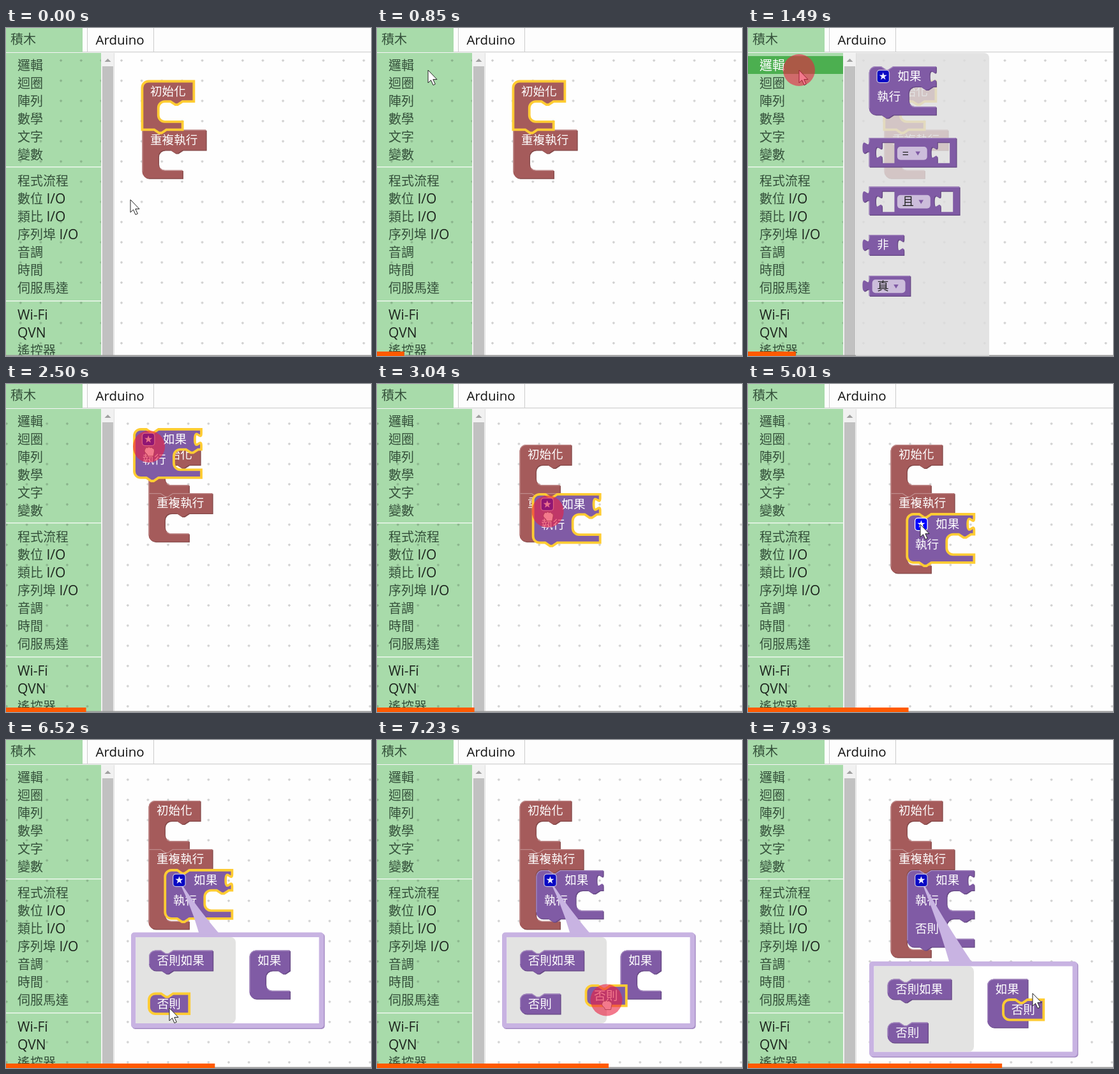
An HTML page for the animation above (8000 ms loop, 572 by 514 pixels).

```html
<!DOCTYPE html>
<html lang="zh-Hant">
<head>
<meta charset="utf-8">
<title>Blocks</title>
<style>
html, body { margin: 0; width: 100%; height: 100%; overflow: hidden; background: #fff; }
svg { display: block; width: 572px; height: 514px; }
text { font-family: "Open Sans", "Noto Sans CJK TC", "Noto Sans CJK", sans-serif; white-space: pre; }
</style>
</head>
<body>
<svg id="stage" viewBox="0 0 572 514">
  <defs>
    <pattern id="dots" width="31.64" height="31.64" patternUnits="userSpaceOnUse">
      <path d="M13.8 15.8h4M15.8 13.8v4" stroke="#c6c6c6" stroke-width="1.2"/>
    </pattern>
  </defs>
  <rect width="572" height="514" fill="#fefefe"/>
  <rect y="39" width="572" height="475" fill="url(#dots)"/>
  <g id="page"></g>
  <g id="scene"></g>
</svg>
<script>
const LOOP = 8000, SCALE = 1.2656;
const RED = { fill: '#a55b5b', light: '#c08c8c', dark: '#844949' };
const PURPLE = { fill: '#805ba5', light: '#a68cc0', dark: '#664984' };
const $ = id => document.getElementById(id);

const rect = (x, y, w, h, fill, extra = '') =>
  `<rect x="${x}" y="${y}" width="${w}" height="${h}" fill="${fill}" ${extra}/>`;
const path = (d, fill, extra = '') => `<path d="${d}" fill="${fill}" ${extra}/>`;
const text = (s, x, y, size, fill) => `<text x="${x}" y="${y}" font-size="${size}" fill="${fill}">${s}</text>`;
const within = (t, a, b) => t >= a && t < b;

// ---- page chrome ----
const groups = [
  [58, ['邏輯', '迴圈', '陣列', '數學', '文字', '變數']],
  [239, ['程式流程', '數位 I/O', '類比 I/O', '序列埠 I/O', '音調', '時間', '伺服馬達']],
  [449, ['Wi-Fi', 'QVN', '遙控器']]
];
// Latin runs are set darker and a little larger than the Chinese
const menuItem = (s, y, fill = '#34503a') =>
  text(s.replace(/[ \w/-]+/, m => `<tspan font-size="21" fill="#1c241d">${m}</tspan>`), 18, y + 7.5, 20, fill);

function chrome() {
  let s = rect(0, 0, 572, 39, '#fdfdfd') + rect(0, 37, 572, 1.2, '#cfcfcf') +
    rect(0, 0, 120, 38, '#a8dbaa') + rect(127, 0, 1, 37, '#ccc') + rect(231, 0, 1, 37, '#ccc') +
    text('積木', 7, 25, 20, '#34503a') + text('Arduino', 140.5, 25.5, 20.5, '#111') +
    rect(0, 39, 149, 475, '#a8dbaa') + rect(0, 39, 149, 475, 'url(#dots)', 'style="mix-blend-mode:multiply"') +
    rect(0, 217, 149, 1.5, '#eef8ee') + rect(0, 427, 149, 1.5, '#eef8ee');
  for (const [y, names] of groups) names.forEach((n, i) => s += menuItem(n, y + 28 * i));
  return s + rect(149, 39, 20, 475, '#f1f1f1') + rect(151, 60, 17, 454, '#c1c1c1') +
    path('M154.5 53l5-5 5 5z', '#a0a0a0') + rect(169, 39, 1, 475, '#ddd') + rect(0, 512.5, 572, 1.5, '#999');
}

// ---- blocks, in unscaled block units ----
const NOTCH = 'l6,4 3,0 6,-4', NOTCH_BACK = 'l-6,4 -3,0 -6,-4';
const SOCKET = 'v5 c0,10 -8,-8 -8,7.5 s8,-2.5 8,7.5';
const PLUG = 'V20 c0,-10 -8,8 -8,-7.5 s8,2.5 8,-7.5';
const hole = (x, w = 15.5) => `M${x + w},5.5 H${x} ${SOCKET} V31.5 h${w} z`;

// arms: heights of the statement openings; flatTop, flatEnd: square corners where blocks join
function block(x, y, o) {
  const { w, color = PURPLE, arms = [], edge = 20, foot = 50, picked } = o;
  let h = o.h || 25;
  let d = o.out || o.flatTop ? 'M0,0' : 'M0,8 A8,8 0 0 1 8,0';
  if (o.prev) d += `H15 ${NOTCH}`;
  d += `H${w}`;
  let shine = '';
  if (o.socket) d += SOCKET;
  d += `V${h}`;
  for (const a of arms) {
    d += `H${edge + 30} ${NOTCH_BACK} h-7 a8,8 0 0 0 -8,8 v${a - 16} a8,8 0 0 0 8,8 H${foot} v10`;
    h += a;
    shine += `M${edge + 2.5},${h - 2} A8,8 0 0 0 ${edge + 8},${h + .5} H${foot - .5}`;
    h += 10;
  }
  if (o.next) d += `H30 ${NOTCH_BACK}`;
  d += o.out ? `H0 ${PLUG} z` : o.flatEnd ? 'H0 z' : 'H8 a8,8 0 0 1 -8,-8 z';
  d += (o.holes || []).map(v => hole(v)).join('');
  const corner = o.flatTop ? 'V.5' : 'V8 A7.5,7.5 0 0 1 8,.5';
  shine += o.out ? `M.5,${h - .5} V18 M.5,5 V.5 H${w - .5}`
    : `M.5,${h - (o.flatEnd ? 0 : 8)} ${corner} ${o.prev ? 'H15 ' + NOTCH : ''} H${w - .5}`;
  const rule = 'fill-rule="evenodd"';
  const body = picked
    ? path(d, color.fill, `${rule} stroke="#fc3" stroke-width="3"`)
    : path(d, color.dark, `${rule} transform="translate(1 1)"`) + path(d, color.fill, rule) +
      path(shine, 'none', `stroke="${color.light}"`);
  const words = (o.words || []).map(([s, tx = 10, ty = 17.7]) => text(s, tx, ty, 14.67, '#fff')).join('');
  return `<g transform="translate(${x} ${y}) scale(${SCALE})">${body}${words}${o.extra || ''}</g>`;
}

function dropdown(x, y, w, s) {
  return rect(x, y, w, 16.5, '#ccbddb', 'rx="4"') + text(s, x + 6, y + 13.2, 14.67, '#222') +
    path(`M${x + w - 14.5},${y + 6} h6 l-3,5 z`, '#805ba5');
}

function star(hot) {
  let pts = '';
  for (let i = 0; i < 10; i++) {
    const r = i % 2 ? 2 : 5, a = Math.PI * (i / 5 - .5);
    pts += `${(17.5 + r * Math.cos(a)).toFixed(2)},${(12.5 + r * Math.sin(a)).toFixed(2)} `;
  }
  return rect(9.8, 4.8, 15.4, 15.4, hot ? '#00f' : '#0808c4', `rx="3.5" stroke="${hot ? '#fff' : '#c9c3dd'}"`) +
    `<polygon points="${pts}" fill="${hot ? '#fff' : '#eef'}"/>`;
}

function ifBlock(x, y, picked, withElse, hot) {
  const words = [['如果', 35.5], ['執行', 10, 42.7]];
  if (withElse) words.push(['否則', 10, 77.7]);
  return block(x, y, { w: 83, edge: 49, foot: 83, arms: withElse ? [25, 25] : [25],
    prev: true, next: true, socket: true, picked, words, extra: star(hot) });
}
const setup = (x, y, picked) => block(x, y,
  { color: RED, w: 64, arms: [25], next: true, flatEnd: true, picked, words: [['初始化']] });
const loop = (x, y, arm) => block(x, y,
  { color: RED, w: 79, arms: [arm], prev: true, flatTop: true, words: [['重複執行']] });
const elseBlock = (x, y, picked) => block(x, y, { w: 50, prev: true, picked, words: [['否則']] });

function flyout(picked) {
  return path('M169,39 H370 a8,8 0 0 1 8,8 V514 H169 z', '#ddd', 'opacity=".82"') +
    ifBlock(189.6, 60, picked) +
    block(189.6, 172, { w: 108, h: 36, out: true, holes: [16, 84.5], extra: dropdown(35, 11, 37, '=') }) +
    block(189.6, 248.5, { w: 112, h: 35, out: true, holes: [16, 88.5], extra: dropdown(35, 10.5, 41, '且') }) +
    block(189.6, 324, { w: 43, out: true, socket: true, words: [['非']] }) +
    block(189.6, 388, { w: 51, out: true, extra: dropdown(4, 5, 41, '真') });
}

function bubble(x, y, w, h, split, tail) {
  const [a, b] = tail, lilac = '#c8b3e2';
  return rect(x + 1.5, y + 1.5, w, h, '#a58cc4', 'rx="5"') + rect(x, y, w, h, lilac, 'rx="5"') +
    path(`M275,230 Q${(275 + a) / 2 + 3},${(230 + y) / 2} ${a},${y + 3} H${b} Q${(275 + b) / 2 - 3},${(230 + y) / 2} 278,230 z`, lilac) +
    rect(x + 7.5, y + 7.5, w - 15, h - 15, '#fff') +
    path(`M${x + 7.5},${y + 7.5} H${split - 8} a8,8 0 0 1 8,8 V${y + h - 15.5} a8,8 0 0 1 -8,8 H${x + 7.5} z`, '#e3e3e2');
}

function mutator(x, y, headX) {
  return block(x, y, { w: 79, prev: true, next: true, words: [['否則如果']] }) +
    block(headX, y, { w: 50, arms: [25], words: [['如果']] });
}

// ---- pointer ----
// time, x, y, sideways bend of the way there
const way = [
  [0, 195, 269], [100, 195, 269], [850, 80, 66], [1660, 80, 66], [2080, 224, 98], [2560, 224, 98],
  [3300, 284, 238], [4250, 284, 238], [4750, 270, 220], [5120, 270, 220], [5880, 256, 420, 49],
  [6840, 256, 420], [7580, 446, 397], [LOOP, 446, 397]
];
const presses = [[1400, 1620], [2130, 3410], [4850, 4990], [5940, 6200], [6700, 7680]];

function mouse(t) {
  const i = way.findIndex(k => k[0] > t);
  const [t0, x0, y0] = way[i - 1], [t1, x1, y1, bend = 0] = way[i];
  const u = (t - t0) / (t1 - t0), e = (1 - Math.cos(Math.PI * u)) / 2;
  return [x0 + (x1 - x0) * e + bend * Math.sin(Math.PI * e), y0 + (y1 - y0) * e];
}

function pointer(x, y, down, fist) {
  const art = fist
    ? path('M-6,4 q1.5,-4 4,-2 q2,-3 4,0 q2,-2 4,1 q3,0 2.5,4 l-1.5,8 h-9 l-1,-3 q-6,-4 -3,-8 z', '#fff', 'stroke="#555" stroke-width=".8"')
    : path('M0,0 V20 L4.5,15.7 L8,23.5 L11.3,22 L7.8,14.6 H14 z', '#fff', 'stroke="#222"');
  const spot = down ? '<circle r="25" fill="#ec2040" opacity=".6"/>' : '';
  return `<g transform="translate(${x} ${y})">${art}${spot}</g>`;
}

function ripple(t, start, x, y) {
  const u = (t - start) / 150;
  return u < 0 || u >= 1 ? '' :
    `<circle cx="${x}" cy="${y}" r="${u * 25 * SCALE}" fill="none" stroke="#888" stroke-width="10" opacity="${1 - u}"/>`;
}

// ---- scene ----
const OPEN = 1400, GRAB = 2130, DRAG = 2330, SNAP = 3410, BUBBLE = 5065, PICK = 5940, PULL = 6850, JOIN = 7680;

function render(t) {
  const [mx, my] = mouse(t);
  const moved = t >= DRAG, snapped = t >= SNAP, joined = t >= JOIN;
  const bx = moved ? 223.4 : 213.4, by = moved ? 95 : 83.5;
  const gx = moved ? 190.8 : 181, gy = moved ? 62.2 : 51;
  $('dots').setAttribute('patternTransform', `translate(${gx - 15.8} ${gy - 15.8})`);

  // the picked block lies on top
  const pair = [setup(bx, by, t < GRAB), loop(bx, by + 76, joined ? 99 : snapped ? 64 : 25)];
  let s = (t < GRAB ? pair.reverse() : pair).join('');
  if (within(t, OPEN, DRAG)) {
    s += flyout(t >= GRAB) + rect(0, 44, 149, 28, '#4caf50') + menuItem('邏輯', 58, '#fff');
  }
  if (snapped) s += ifBlock(249.3, 204, t < PULL, joined, within(t, 4600, 5200));
  else if (moved) s += ifBlock(mx - 23, my - 27, true);
  s += ripple(t, SNAP, 279, 208);

  if (joined) {
    s += bubble(190, 347, 326, 149, 354, [316, 352]) + mutator(218.5, 374.5, 375) +
      elseBlock(218.5, 442.5) + elseBlock(400, 407, true) + ripple(t, JOIN, 429, 411);
  } else if (t >= BUBBLE) {
    s += bubble(196, 301.5, 302, 150, 360, [303, 335]) + mutator(224, 329.5, 381.5) +
      elseBlock(224, 397.5, within(t, PICK, PULL));
    if (t >= PULL) s += elseBlock(mx - 32, my - 22.5, true);
  }

  const down = presses.some(([a, b]) => within(t, a, b));
  const fist = within(t, DRAG, SNAP) || within(t, PULL, JOIN);
  s += pointer(mx, my, down, fist) + rect(0, 507, t * .0502, 7, '#ff5a00');
  $('scene').innerHTML = s;
}

$('page').innerHTML = chrome();
const begin = performance.now();
function tick() {
  render((performance.now() - begin) % LOOP);
  requestAnimationFrame(tick);
}
tick();
</script>
</body>
</html>
```
